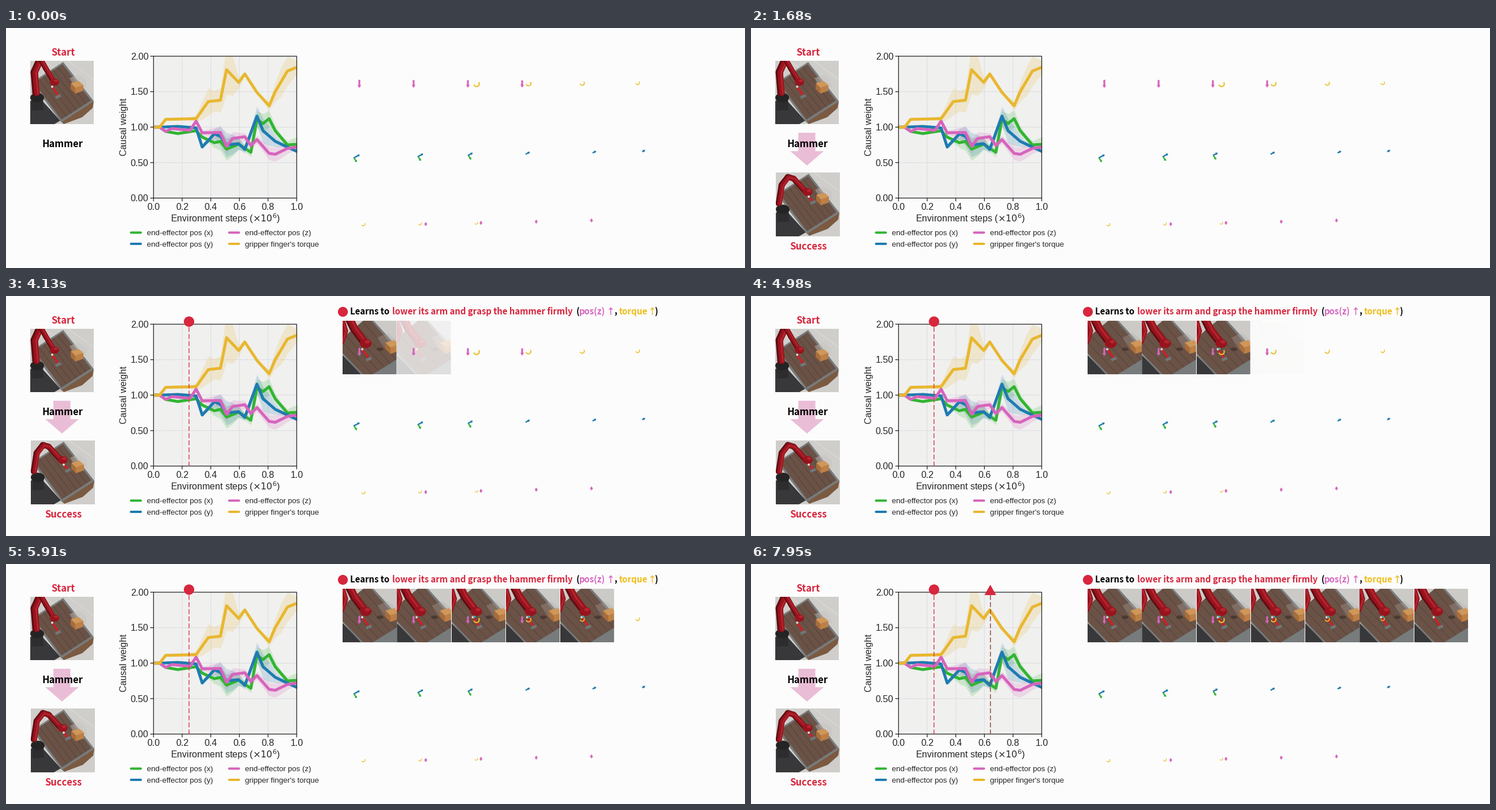
Recreate the animation shown at these times as a matplotlib script. Size 1280 px wide and 417 px high, loop 7990 ms.

```python
import numpy as np
import matplotlib.pyplot as plt
from matplotlib.animation import FuncAnimation
from matplotlib.collections import PolyCollection
from matplotlib.patches import Circle, Polygon, Rectangle

W, H, DPI = 1280, 417, 64
FRAMES, STEP = 235, 34
FIRST, GAP, FADE = 260, 470, 430     # first cue, cue spacing, fade length (ms)

PAPER, RED, INK = "#fcfcfc", "#d7263d", "#262626"
GREEN, BLUE, PINK, GOLD = "#32b432", "#1f7bb0", "#d664bd", "#e8b72f"
ICON_GOLD = "#e8bf26"
SANS, HEAD = "Liberation Sans", "Noto Sans CJK JP"

plt.rcParams["path.snap"] = False
fig = plt.figure(figsize=(W / DPI, H / DPI), dpi=DPI, facecolor=PAPER)
ax = fig.add_axes([0, 0, 1, 1])
ax.set_xlim(0, W)
ax.set_ylim(H, 0)
ax.axis("off")


def pt(px):
    return px * 72 / DPI


def label(x, y, text, size, color=INK, font=SANS, **kw):
    return ax.text(x, y, text, fontsize=pt(size), color=color, family=font,
                   zorder=8, **kw)


def heading(x, y, text, size, color, ha="center"):
    return label(x, y, text, size, color, HEAD, weight="bold", ha=ha)


def stroke(xs, ys, color, width, z=4, **kw):
    return ax.plot(xs, ys, color=color, lw=pt(width), zorder=z, **kw)[0]


def fill(points, color, z):
    return ax.add_patch(Polygon(points, fc=color, ec="none", zorder=z))


def disc(x, y, r):
    return ax.add_patch(Circle((x, y), r, fc=RED, ec="none", zorder=6))


def shape_set(shapes, z):
    """One collection from (polygon, colour) pairs."""
    polys, colors = zip(*shapes)
    group = PolyCollection(polys, facecolors=colors, edgecolors="none", zorder=z)
    ax.add_collection(group, autolim=False)
    return group


# ---- polygon helpers -------------------------------------------------

def axes_of(p, q):
    p, q = np.array(p, float), np.array(q, float)
    d = (q - p) / np.hypot(*(q - p))
    return p, q, d, np.array([-d[1], d[0]])


def bar(p, q, w):
    p, q, _, n = axes_of(p, q)
    n = n * w / 2
    return [p + n, q + n, q - n, p - n]


def arrow(p, q, w):
    p, q, d, n = axes_of(p, q)
    neck = q - d * w * 1.4
    return [p + n * w / 2, neck + n * w / 2, neck + n * w, q + n * w / 5,
            q - n * w / 5, neck - n * w, neck - n * w / 2, p - n * w / 2]


def blob(x, y, rx, ry=None):
    a = np.linspace(0, 2 * np.pi, 25)
    return np.c_[x + rx * np.cos(a), y + (ry or rx) * np.sin(a)]


def limb(points, w, color):
    """Thick rounded path as a run of polygons."""
    out = [(bar(p, q, w), color) for p, q in zip(points, points[1:])]
    return out + [(blob(x, y, w / 2), color) for x, y in points]


# ---- photographs as flat shapes --------------------------------------

ARM, SHADE, SHINE = "#98131d", "#5f0c13", "#b5252e"
WOOD, PLANK, RIM, DARK = "#6a5246", "#5a463c", "#777b7c", "#38383a"


def square(size, color):
    return [([(0, 0), (size, 0), (size, size), (0, size)], color)]


def wood(corners, n=6):
    a, b, c, d = np.array(corners, float)
    seams = [(bar(a + (d - a) * f, b + (c - b) * f, 1.2), PLANK)
             for f in np.arange(1, n) / n]
    return [(corners, WOOD)] + seams


def block(x, y, s):
    """Box seen from above: top, left and right face."""
    a, b, c, d = np.array([(0, 4), (14, 0), (22, 7), (8, 12)]) * s + (x, y)
    h = np.array([0, 10 * s])
    return [([a, b, c, d], "#cf9759"), ([a, d, d + h, a + h], "#a96d3a"),
            ([d, c, c + h, d + h], "#bd8046")]


def robot(path, w):
    layers = [(-.12, 1, SHADE), (.06, .8, ARM), (.18, .22, SHINE)]
    return [part for shift, k, color in layers
            for part in limb(np.array(path) + w * shift * np.array([1, .3]),
                             w * k, color)]


def hand(x, y, r):
    return [(blob(x, y, r, r * .8), ARM),
            (blob(x + r * .3, y - r * .3, r * .45, r * .3), SHINE)]


def hammer(x, y, dx, dy, teal=False):
    tx, ty = x + dx, y + dy
    out = [(bar((x, y), (tx, ty), 3.6), "#d01f26"),
           (bar((tx - 4, ty + 4), (tx + 5, ty), 5), "#707678"),
           (blob(x - 1, y - 1, 2), "#dcd8d6")]
    return out + [(blob(x + 2, y - 2, 2), "#46a79b")] * teal


def room(done):
    out = square(111, "#cfcecb")
    out += [(bar((x, 0), (x + 60, 44), .8), "#e2e1de") for x in (24, 66)]
    out += [([(54, 106), (110, 70), (108, 82), (90, 98), (58, 110)], "#7b5a42"),
            ([(0, 70), (14, 62), (52, 104), (40, 111), (0, 111)], DARK),
            ([(57, 2), (110, 70), (54, 107), (2, 38)], RIM)]
    out += wood([(56, 6), (105, 69), (54, 102), (7, 38)])
    out += [([(68, 30), (84, 24), (97, 34), (97, 47), (80, 50)],
             (.78, .77, .75, .45))] + block(70, 35, 1)
    out += [(bar((12, 62), (13, 86), 20), "#2d2d2f"),
            (blob(12, 64, 12, 8), "#242425")]
    if done:
        return (out + robot([(6, 54), (11, 22), (22, 8), (32, 11), (51, 32)], 10)
                + hand(55, 34, 8.5) + hammer(58, 43, 6, 7))
    return (out + robot([(17, 0), (8, 20), (11, 56)], 12)
            + robot([(18, -4), (28, 14), (40, 34)], 9)
            + hand(42, 37, 8) + hammer(39, 46, 9, 14))


def closeup(i):
    grasp = 2 <= i <= 5
    x = 2 if grasp else -1
    out = square(94, "#cbcac7")
    out += [([(46, -8), (104, 56), (94, 94), (30, 94), (-14, 42)], RIM),
            ([(0, 60), (32, 94), (0, 94)], DARK)]
    out += wood([(44, -6), (103, 62), (42, 100), (-14, 42)])
    out += [([(60, 30), (78, 22), (94, 34), (94, 50), (72, 48)],
             (.7, .68, .66, .3)), (blob(65, 50, 6, 3), "#4a3a32")]
    out += block(74, 34, 1.1)
    out += robot([(-2, -2), (4, 18), (-2, 36)], 12)
    out += robot([(13 + x, -4), (22 + x, 14), (37 + x, 34)], 14)
    return out + hand(41 + x, 40, 10) + hammer(36 + x, 51, 10, 14, grasp)


def photo(x, y, size, shapes):
    """Draw a clipped picture; return the paper-coloured veil over it."""
    pic = shape_set([(np.array(p) + (x, y), c) for p, c in shapes], 2)
    pic.set_clip_path(Rectangle((x, y), size, size, transform=ax.transData))
    return ax.add_patch(Rectangle((x - 1, y - 1), size + 2, size + 2,
                                  fc=PAPER, ec="none", zorder=3))


# ---- chart -----------------------------------------------------------

X0, X1, Y0, Y1 = 255.5, 503.5, 295.5, 49


def px(v):
    return X0 + (X1 - X0) * v


def py(v):
    return Y0 + (Y1 - Y0) * v / 2


frame = ax.add_patch(Rectangle((X0, Y1), X1 - X0, Y0 - Y1, fc="#f0f0ef",
                               ec="none", zorder=1))
DOTS = dict(color="#c4c4d2", width=1.2, z=2, ls=(0, (1, 1.65)))
for v in np.linspace(0, 1, 6):
    if 0 < v < 1:
        stroke([px(v)] * 2, [Y0, Y1], **DOTS)
    stroke([px(v)] * 2, [Y0, Y0 + 5], INK, 1.3)
    label(px(v), 316, f"{v:.1f}", 16, ha="center")
for v in np.linspace(0, 2, 5):
    if 0 < v < 2:
        stroke([X0, X1], [py(v)] * 2, **DOTS)
    stroke([X0 - 5, X0], [py(v)] * 2, INK, 1.3)
    label(247, py(v) + 5.7, f"{v:.2f}", 16, ha="right")
label(380, 337, r"Environment steps ($\times 10^6$)", 16, ha="center")
label(204, 172, "Causal weight", 16, rotation=90, ha="center", va="center")

STEPS = np.arange(25)
# name, colour, turning points (step, weight), band bumps (centre, height, width)
SERIES = [
    ("end-effector pos (x)", GREEN,
     [(1, 1), (2, .94), (4, .91), (7, .95), (8, .86), (10, .78), (11, .8),
      (12, .69), (14, .76), (16, .645), (17, 1.11), (18, 1.05), (19, 1.12),
      (20, .95), (22, .75), (24, .76)],
     [(12, .14, 2), (18, .12, 2), (24, .09, 2)]),
    ("end-effector pos (y)", BLUE,
     [(1, 1), (4, 1.01), (7, .99), (8, .72), (10, .905), (11, .87), (12, .75),
      (14, .767), (15, .686), (17, 1.156), (18, .95), (20, .8), (24, .64)],
     [(12, .15, 2), (18, .15, 2)]),
    ("end-effector pos (z)", PINK,
     [(1, 1), (2, .94), (3, .98), (6, .955), (7, 1.085), (8, .92), (11, .925),
      (12, .73), (13, .84), (15, .865), (16, .74), (17, .825), (19, .63),
      (20, .617), (22, .7), (24, .726)],
     [(12, .08, 3), (20, .08, 3)]),
    ("gripper finger's torque", GOLD,
     [(1, 1), (2, 1.11), (7, 1.12), (9, 1.36), (11, 1.38), (12, 1.81),
      (14, 1.63), (15, 1.75), (17, 1.49), (19, 1.3), (20, 1.5), (22, 1.79),
      (24, 1.86)],
     [(9, .17, 1.5), (12.3, .34, 1.3), (21.5, .2, 2)]),
]
for i, (name, color, turns, bumps) in enumerate(SERIES):
    mid = np.interp(STEPS, *zip(*turns))
    spread = .02 + sum(h * np.exp(-((STEPS - c) / w) ** 2) for c, h, w in bumps)
    xs = X0 + 10.54 * STEPS
    band = ax.fill_between(xs, py(mid - spread), py(mid + spread), color=color,
                           alpha=.18, lw=0, zorder=3)
    line = stroke(xs, py(mid), color, 5, 4 + i / 10)
    for art in (band, line):
        art.set_clip_path(frame)
    kx, ky = 216.5 + 170 * (i // 2), 355.5 + 19.5 * (i % 2)
    stroke([kx, kx + 17], [ky, ky], color, 4, solid_capstyle="round")
    label(kx + 27.5, ky + 4.8, name, 13.3)
ax.add_patch(Rectangle((X0, Y1), X1 - X0, Y0 - Y1, fc="none", ec=INK,
                       lw=pt(1.3), zorder=5))

# ---- small direction icons -------------------------------------------


def hook(x, y, r):
    turn = np.radians(np.linspace(-25, 150, 20))
    stroke(x + r * np.cos(turn), y + r * np.sin(turn), ICON_GOLD, r * .45, 6)


icons = []
for i in range(4):
    x, y = 612 + 94 * i, 90 + i / 3
    icons.append((arrow((x, y), (x, y + 13.5 - i / 2), 3.2), PINK))
    x, y = 727 + 95.7 * i, 343.5 - 2.1 * i
    icons.append((arrow((x, y), (x, y - 6), 2.8), PINK))
    hook(815 + 88.5 * i + 1.5 * i * i, 97 - .6 * i, 4.7 - .5 * i)
for i in range(3):
    hook(619 + 97.8 * i, 341 - 1.2 * i, 2.8 - .2 * i)
for i, x in enumerate([602, 713, 800, 900, 1016, 1102]):
    y, size = 226 - 2.2 * i, 10.5 - 1.1 * i
    icons.append((arrow((x, y), (x + size, y - size * .55), 2.4), BLUE))
    if i < 3:
        icons.append((arrow((x + 1, y), (x + 5.5, y + 7), 2.4), GREEN))
shape_set(icons, 6)

# ---- things that fade in, one after another --------------------------


def guide(x, color):
    return stroke([x, x], [54, Y0], color, 1.5, 5, ls=(0, (5.6, 2.6)))


heading(99, 47.5, "Start", 16.5, RED)
heading(97.5, 207, "Hammer", 16.5, "black")
photo(42, 57, 110, room(False)).set_visible(False)

big_arrow = fill([(82, 182), (111.5, 182), (111.5, 214), (126, 214), (97, 239),
                  (68, 214), (82, 214)], "#eabdd7", 2)
success = photo(43, 251, 111, room(True))
wedge = fill([(414.5, 36), (424.5, 54), (404.5, 54)], RED, 6)
YELLOW = "#efbd1c"
title = [heading(x, 32, text, 14.9, color, "left") for x, text, color in [
    (596.5, "Learns to", "black"),
    (669, "lower its arm and grasp the hammer firmly", RED),
    (987.5, "(", "black"), (993, "pos(z)", PINK), (1053, ",", "black"),
    (1062, "torque", YELLOW), (1123.5, ")", "black")]]
title += [heading(1046, 32, "↑", 14.9, PINK),
          heading(1118.5, 32, "↑", 14.9, YELLOW)]
thumbs = [photo(583 + 94.25 * i, 42.5, 93.5, closeup(i)) for i in range(7)]

veils = {success, *thumbs}
CUES = [[big_arrow], [success], [heading(99.5, 385, "Success", 16.5, RED)],
        [disc(317, 44.5, 9)], [guide(317, "#dc3f52")], [disc(583.5, 27.5, 8.6)],
        title, *[[t] for t in thumbs], [wedge], [guide(414.7, "#8c4a42")]]


def draw(i):
    for n, group in enumerate(CUES):
        a = float(np.clip((i * STEP - FIRST - n * GAP) / FADE, 0, 1))
        for art in group:
            shown = 1 - a if art in veils else a
            art.set_alpha(shown)
            art.set_visible(shown > 0)
    return []


anim = FuncAnimation(fig, draw, frames=FRAMES, interval=STEP,
                     init_func=lambda: draw(0), repeat=True, repeat_delay=0,
                     blit=False)
plt.show()
```
